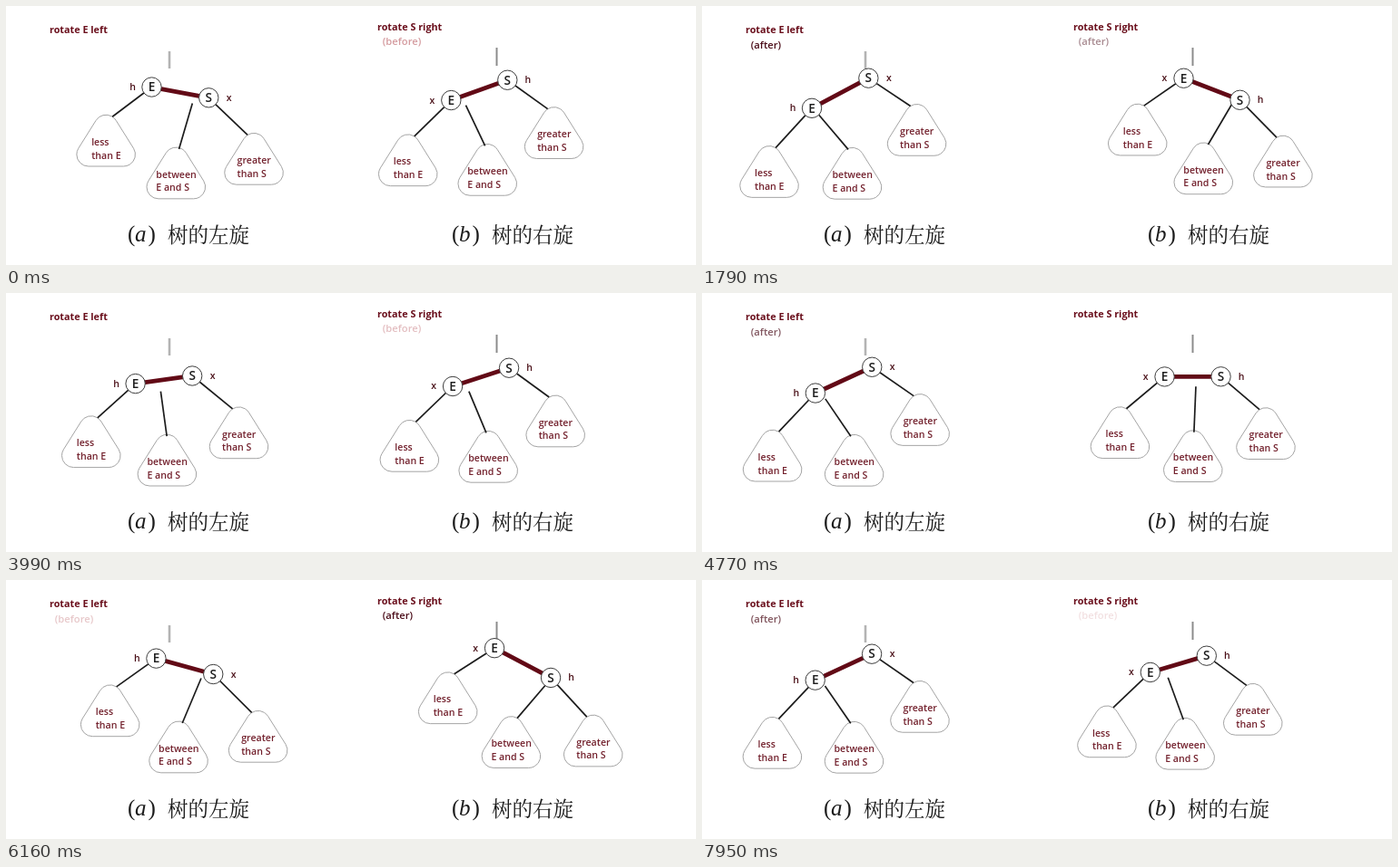
Write an HTML page with a canvas that moves like this. It is 760x286 px and loops after 8000 ms.

```html
<!DOCTYPE html>
<html lang="zh">
<head>
<meta charset="utf-8">
<title>Tree rotations</title>
<style>
  html, body { margin: 0; width: 100%; height: 100%; overflow: hidden; background: #fff; }
  canvas { display: block; }
</style>
</head>
<body>
<canvas id="stage" width="760" height="286"></canvas>
<script>
const ctx = document.getElementById('stage').getContext('2d');
const LOOP = 8000, STEP = 78, TRAVEL = 62;
const SANS = '"Open Sans", "Noto Sans", sans-serif';
const SERIF = '"Liberation Serif", serif';
const CJK = '"Noto Serif CJK SC", "Noto Sans CJK SC", "Noto Sans CJK", serif';
const WINE = '#6a0f1c', SOFT_WINE = '#72202c', INK = '#1c1c1c';

// Each part runs from [x, y] with E on top to [x, y] with S on top.
// Subtree points are the middle of the bottom edge.
const trees = [
  {
    title: 'rotate E left', titleAt: [48, 30], label: [53.8, 47],
    stem: [180, 50, 69, 2.6, '#b4b4b4'], sling: 107, names: ['h', 'x'],
    lead: 1.24, period: 3.19, hold: 0.38, rate: 22.7, reverse: false,
    E: [[180, 78], [118, 114.6]],
    S: [[243, 112], [180.3, 78]],
    less: [[128, 160], [71.3, 214]],
    between: [[198.1, 212.7], [163.8, 213.2]],
    greater: [[291.1, 213], [233.8, 162.8]]
  },
  {
    title: 'rotate S right', titleAt: [409, 27], label: [414.8, 43],
    stem: [540.5, 46, 66, 2, '#8c8c8c'], sling: 103, names: ['x', 'h'],
    lead: 0.89, period: 3.9, hold: 0.34, rate: 22.4, reverse: true,
    E: [[540, 74], [478, 111.5]],
    S: [[602, 109], [540, 75]],
    less: [[488.5, 157], [431.4, 209]],
    between: [[557.5, 207.4], [523.5, 209.7]],
    greater: [[648.5, 207.4], [592.5, 158.8]]
  }
];

const clamp = v => Math.min(1, Math.max(0, v));
const mix = ([a, b], q) => [a[0] + (b[0] - a[0]) * q, a[1] + (b[1] - a[1]) * q];

function text(str, x, y, font, color, align = 'left') {
  ctx.font = font;
  ctx.fillStyle = color;
  ctx.textAlign = align;
  ctx.fillText(str, x, y);
}

function line(x1, y1, x2, y2, width, color) {
  ctx.beginPath();
  ctx.moveTo(x1, y1);
  ctx.lineTo(x2, y2);
  ctx.lineWidth = width;
  ctx.strokeStyle = color;
  ctx.stroke();
}

function outline(color) {
  ctx.fillStyle = '#fff';
  ctx.fill();
  ctx.lineWidth = 1;
  ctx.strokeStyle = color;
  ctx.stroke();
}

function node(letter, [x, y]) {
  ctx.beginPath();
  ctx.arc(x, y, 10.7, 0, Math.PI * 2);
  outline('#3c3c3c');
  text(letter, x, y + 4.8, `600 13.6px ${SANS}`, INK, 'center');
}

// Rounded triangle: the hull of three equal circles.
function subtree([x, bottom], lines, indent) {
  const r = 13, half = 19.3, tilt = 0.547;
  const low = bottom - r, high = bottom - 56.8 + r;
  ctx.beginPath();
  ctx.arc(x, high, r, Math.PI + tilt, -tilt);
  ctx.arc(x + half, low, r, -tilt, Math.PI / 2);
  ctx.arc(x - half, low, r, Math.PI / 2, Math.PI + tilt);
  ctx.closePath();
  outline('#a4a4a4');
  lines.forEach((s, i) =>
    text(s, x - indent, bottom - 23.2 + i * 14.8, `600 10.6px ${SANS}`, SOFT_WINE));
}

// Steady travel that settles softly over its last tenth.
function progress(tree, t) {
  const age = (t + tree.lead) % tree.period;
  const raw = Math.max(0, age - tree.hold) * tree.rate / TRAVEL;
  return raw < 0.9 ? raw : 0.9 + 0.1 * (1 - Math.exp((0.9 - raw) / 0.1));
}

function label(str, [x, y], alpha, color) {
  if (alpha <= 0) return;
  ctx.globalAlpha = alpha;
  text(str, x, y, `600 11.2px ${SANS}`, color);
  ctx.globalAlpha = 1;
}

function drawTree(tree, t) {
  const p = progress(tree, t);
  const q = tree.reverse ? 1 - p : p;
  const [E, S, less, between, greater] =
    ['E', 'S', 'less', 'between', 'greater'].map(k => mix(tree[k], q));

  text(tree.title, ...tree.titleAt, `700 10.8px ${SANS}`, WINE);
  label('(before)', tree.label, clamp(1 - (p - 0.1) / 0.18), '#a02028');
  label('(after)', tree.label, clamp((p - 0.75) / 0.2), '#4a0c18');

  const [sx, top, end, width, color] = tree.stem;
  line(sx, top, sx, end, width, color);

  subtree(less, ['less', 'than E'], 16);
  subtree(between, ['between', 'E and S'], 22);
  subtree(greater, ['greater', 'than S'], 18.5);

  const rim = 54.8;
  line(...E, less[0] + 7, less[1] - rim, 1.7, INK);
  line(...S, greater[0] - 7, greater[1] - rim, 1.7, INK);
  line(E[0] + 63.4 - 59 * q, tree.sling + 45 * (q - 0.42) ** 2,
    between[0] + 7 - 12 * q, between[1] - rim, 1.7, INK);
  line(...E, ...S, 4.8, '#620a16');

  node('E', E);
  node('S', S);
  const small = `600 10.5px ${SANS}`;
  text(tree.names[0], E[0] - 21, E[1] + 3.5, small, '#4a1018', 'center');
  text(tree.names[1], S[0] + 22.5, S[1] + 3.5, small, '#4a1018', 'center');
}

function caption(x, letter, words) {
  const paren = `25px ${SERIF}`;
  text('(', x, 259.5, paren, INK);
  text(letter, x + 8, 260, `italic 25px ${SERIF}`, INK);
  text(')', x + 22.5, 259.5, paren, INK);
  text(words, x + 44, 261.3, `300 22.5px ${CJK}`, INK);
}

function frame() {
  const now = performance.now() % LOOP;
  const t = Math.floor(now / STEP + 0.2) * STEP / 1000;
  ctx.fillStyle = '#fff';
  ctx.fillRect(0, 0, 760, 286);
  trees.forEach(tree => drawTree(tree, t));
  caption(134, 'a', '树的左旋');
  caption(491, 'b', '树的右旋');
  requestAnimationFrame(frame);
}
frame();
</script>
</body>
</html>
```
